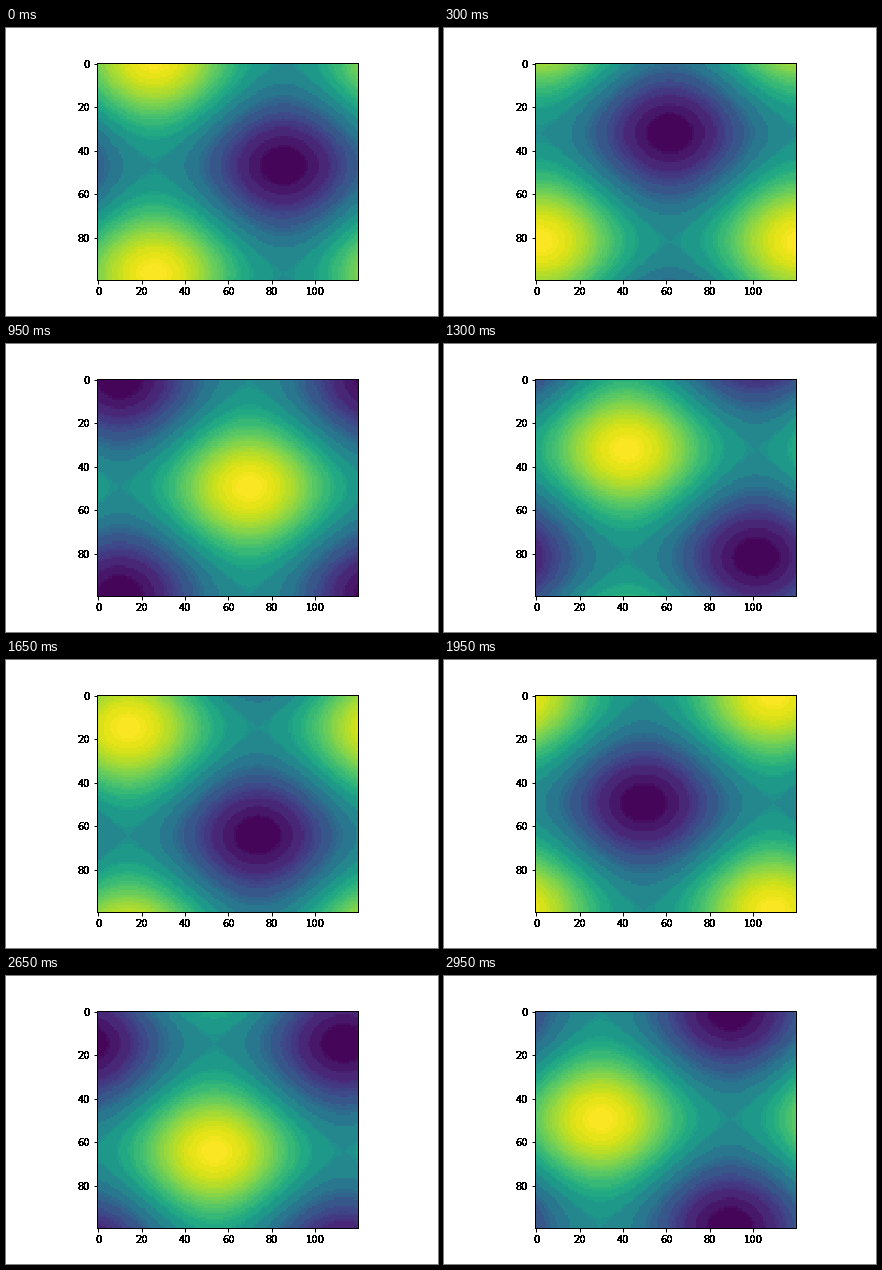
A matplotlib script that plays this animation: 432 px wide and 288 px high, repeating every 3000 ms.

```python
import numpy as np
import matplotlib.pyplot as plt
from matplotlib.animation import FuncAnimation
from matplotlib.colors import ListedColormap

FRAMES = 60
INTERVAL = 50

plt.rcParams.update({
    "font.family": "DejaVu Sans",
    "font.size": 10,
    "axes.linewidth": 1,
    "xtick.major.width": 1,
    "ytick.major.width": 1,
})


def banded(name, step=16):
    """Merge neighbouring colours of a colormap into flat bands."""
    rgb = plt.get_cmap(name)(np.arange(256), bytes=True)[:, :3].astype(int)
    _, band = np.unique(rgb // step, axis=0, return_inverse=True)
    band = band.ravel()
    flat = np.array([rgb[band == b].mean(axis=0) for b in band])
    return ListedColormap(flat / 255)


def harden(img, dpi):
    """Turn soft glyph edges into solid pixels."""
    out = img.copy()
    out[..., :3] = 0
    out[..., 3] = img[..., 3] > 0.08
    return out, 0, 0


x = np.linspace(0, 2 * np.pi, 120)
y = np.linspace(0, 2 * np.pi, 100).reshape(-1, 1)


def wave(i):
    n = i + 1
    return np.sin(x + n * np.pi / 15) + np.cos(y + n * np.pi / 20)


fig, ax = plt.subplots(figsize=(6, 4), dpi=72, facecolor="white")
fig.subplots_adjust(left=0.125, right=0.9, bottom=0.125, top=0.88)
image = ax.imshow(wave(0), cmap=banded("viridis"), vmin=-2, vmax=2,
                  interpolation="nearest")
ax.set_xticks(range(0, 120, 20))
ax.set_yticks(range(0, 100, 20))
for label in ax.get_xticklabels() + ax.get_yticklabels():
    label.set_agg_filter(harden)


def update(i):
    image.set_data(wave(i))
    return [image]


anim = FuncAnimation(fig, update, frames=FRAMES, interval=INTERVAL,
                     repeat=True, blit=False)
plt.show()
```
